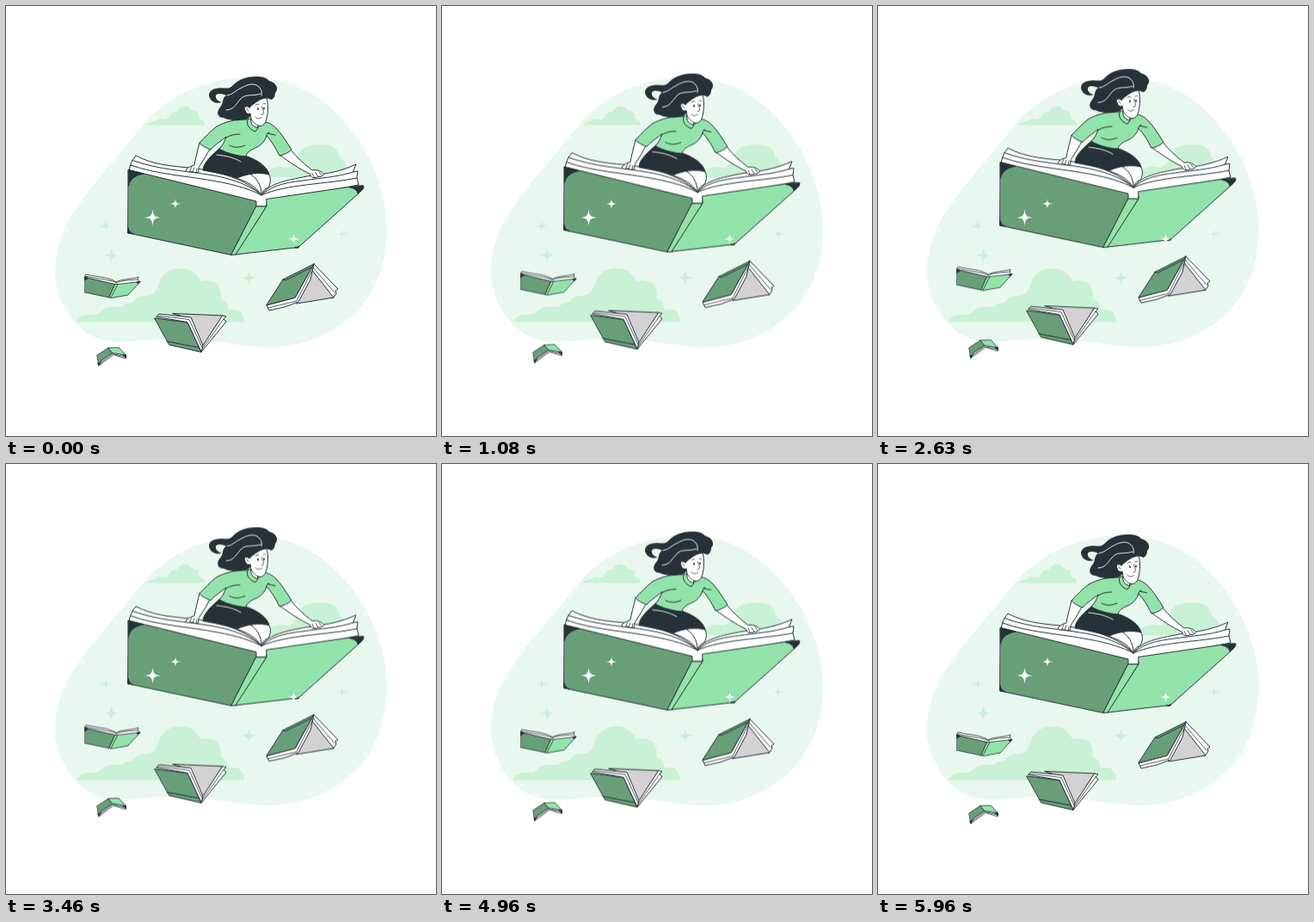
An HTML page without scripts that plays this animation: 500x500 px, repeating every 6 s.

```html
<!DOCTYPE html>
<html lang="en">
<head>
<meta charset="utf-8">
<title>Flying books</title>
<style>
  html, body { margin: 0; width: 100%; height: 100%; overflow: hidden; background: #fff; }
  svg { display: block; width: 100vw; height: 100vh; }
  .pale { fill: #e8f8ee; }
  .mist { fill: #c9f1d5; }
  .white { fill: #fff; }
  .ink { fill: #263238; }
  .dark { fill: #689f78; }
  .light { fill: #92e3a9; }
  .gray { fill: #d3d1d2; }
  .none { fill: none; }
  .thin { stroke-width: .8; }
  .shine { fill: none; stroke: #fff; stroke-width: .9; }
  .float {
    stroke: #263238; stroke-width: 1; stroke-linejoin: round; stroke-linecap: round;
    animation: float 6s infinite;
  }
  @keyframes float {
    0%, 100% { transform: translateY(0); animation-timing-function: steps(72); }
    50% { transform: translateY(-10px); animation-timing-function: steps(72); }
  }
</style>
</head>
<body>
<svg viewBox="0 0 500 500">
  <defs>
    <path id="star" d="M0-10C.6-2.200 2.200-.6 10 0C2.200.6.6 2.200 0 10C-.6 2.200-2.200.6-10 0C-2.200-.6-.6-2.200 0-10Z"/>
  </defs>

  <path class="pale" d="M283 83C235 83 185 105 157 141C130 176 95 212 75 246C60 272 54 300 58 322C63 350 82 378 108 387C130 394 160 388 185 387C230 384 260 396 305 397C345 398 392 378 418 343C440 312 445 275 442 243C437 190 405 135 360 105C335 89 310 83 283 83Z"/>

  <g class="mist">
    <path d="M163 138.500C167 134 171 135 175 133C178 130 183 133 187 131.500C190 129 190 125 194 123.500C197 123 198 124 200 121C202 116.500 211 115 214 119C216 123 221 121 223.500 125C225 128 223 130 226 132C230 133 231 136 231 138.500Z"/>
    <path d="M300 199C304 191 311 187 319 187C326 187 329 190 334 184C340 180 338 172 345 166C352 161 374 159 382 165C388 170 386 176 391 179C398 183 395 189 402 192L406 199Z"/>
    <path d="M82 367.500C86 360 93 358 102 359C110 359 111 351 121 350C130 349 133 352 139 347C144 344 146 347 150 342C154 336 161 338 168 336C176 333 175 327 178 322C182 310 191 305 204 305C214 305 222 311 226 320C234 318 243 319 247 326C251 332 249 337 250 341C257 343 258 348 259 353C264 354 269 351 273 356C276 360 277 364 276.500 367.500Z"/>
    <use href="#star" transform="translate(116 256) scale(.72)"/>
    <use href="#star" transform="translate(122.500 290)"/>
    <use href="#star" transform="translate(282.500 316)"/>
    <use href="#star" transform="translate(391 265) scale(.65)"/>
  </g>

  <g class="float">
    <!-- open book: pages -->
    <path class="white" d="M143 191L145 184L147 179.500L151 174C170 184 190 186 212 188C250 192 280 202 297 220C306 206 325 203 350 198C375 195 390 192 407 184L403.500 193L409 192L408 200L410 208L303 229V233H291Z"/>
    <path class="none" d="M147 179.500C180 191 205 191 235 196C262 200 285 209 297 220M145 185C175 196 215 198 245 204C268 208 286 214 297 220M403.500 193C385 199 365 200 345 203C320 206 308 210 297 220M408 200C375 207 325 207 297 220"/>

    <!-- rider: legs and skirt -->
    <path class="white" d="M268 197C282 193 297 192 306 196C308 200 308 206 305 211C300 213 298 216 297 220C291 210 281 204 264 199Z"/>
    <path class="none" d="M283 195C291 199 297 208 297 219"/>
    <path class="ink" d="M249 165C241 172 229 182 229 191C240 193 256 196 269 200C280 195 295 193 306 196C304 187 293 179 278 174Z"/>
    <path class="shine" d="M245 173C255 174 265 176 273 181"/>

    <!-- arms -->
    <path class="white" d="M225 159C223 168 220 178 219 185C215 186 211 188 209 191C210 194 213 193 215 192C218 194 221 194 224 193C223 189 225 186 227 183C231 177 234 172 237 166Z"/>
    <path class="none thin" d="M213.500 192.500L216 187M217 193.500L219 188M221 194L222 189"/>
    <path class="white" d="M318 173C330 182 342 190 353 195C355 198 355 200 358 199.500C361 200 362 199 363 198.500C366 199 367 198 367.500 197.500C370 197 370 195 367 193C364 191 360 190 356 191C347 184 338 176 331 167Z"/>
    <path class="none thin" d="M358 199L356 194.500M363 198.500L360 193.500M367.500 197.500L364 193"/>

    <!-- shirt -->
    <path class="light" d="M281 132C268 131 254 135 245 140C238 145 231 153 225 159C228 163 233 165 238 167C242 162 250 157 256 152C254 158 252 162 248 166C256 171 268 174 279 175C280 170 285 167 290 165C297 162 301 157 303 151C309 157 314 166 318 174C323 173 328 171 332 167C326 158 321 149 314 142C309 137 304 135 301 135L291 143Z"/>
    <path class="none" d="M272 149C266 149 261 150 256 153M303 151C303 149 304 148 306 147M260 162C265 165 271 165 278 162M304 148L313 150"/>

    <!-- hair behind the face -->
    <path class="ink" stroke="none" d="M292 82C280 81.500 269 86 263 93C258 98 254 94 247 95.500C238 96 234 102 237 107C239 112 246 114 251 112C247 111 243 108 244 104C246 101 252 102 256 104C250 108 254 113 248 119C244 125 247 130 253 130C261 134 274 134 281 131C287 127 288 121 286 115L303 107L309 109C312 107 313 104 313 101C318 96 314 89 306 87C303 83 297 82 292 82Z"/>

    <!-- face and neck -->
    <path class="white" d="M283 118C279 115 276 118 278 121C279 125 281 126 284 125C285 128 285 131 284 135C284 140 289 143 292 142L293 139C299 141 302 136 303 131C305 123 305 113 303 107C296 107 290 112 283 118Z"/>
    <path class="light" d="M281 132C279 137 282 143 290 146L293 142C287 140 284 137 285 131Z"/>
    <path class="none thin" d="M285 131C287 135 290 138 293 139M297.500 117C298 121 301 123 299 125.500L297 126M290 129C292 131.500 295 131.500 297.500 129.500M290 115.500C291 114 293 113.500 294 114.500M299 114C300 113 301 113 302 114M279.500 119L282 122"/>
    <ellipse class="ink" cx="293" cy="119.500" rx=".9" ry="1.500" stroke="none"/>
    <ellipse class="ink" cx="300" cy="119" rx=".9" ry="1.500" stroke="none"/>
    <path class="shine" d="M257 104C264 103 267 98 274 95C281 91 289 89 294 94C297 97 298 101 297 104M256 121C266 121 268 112 274 107C279 102 289 105 296 102"/>

    <!-- open book: covers -->
    <path class="dark" d="M142.500 190.500L291 227V233L262 289.500L142 264Z"/>
    <path class="ink" d="M142.500 190.500L160 195C149 197 144 202 142.500 209ZM142 258C143 262 145 264 148 265L142 264Z"/>
    <path class="light" d="M291 233H303L268 289L262 289.500Z"/>
    <path class="light" d="M303 224.500L408 209L416 209C416 213 414 214 411 217L340 280.500L267 289L303 233Z"/>
    <path class="ink" d="M400 211L415 209C417 212 413 215 409 218C408 214 405 212 400 211ZM336 281L341 279.500L340 281Z"/>

    <!-- small open book -->
    <g class="thin">
      <path class="white" d="M91.500 315L93 312C105 315 120 315 128 321C135 317 146 318 154 315L153 318L156 321L129 325L127 324Z"/>
      <path class="none" d="M92 314C105 317 120 318 128 321.500M153 318C143 319 134 319 128 322"/>
      <path class="dark" d="M91.500 315.500L127 323.500L120 339L91.500 333Z"/>
      <path class="light" d="M127 323.500H130L156 320.500L142 336L123 339.500L120 339Z"/>
      <path class="none" d="M130 323.500L122 339"/>
      <path class="ink" d="M91.500 315L96 316.500L91.500 319ZM152 321L156 320.500L154 323Z"/>
    </g>

    <!-- tiny tented book -->
    <g class="thin">
      <path class="white" d="M108 418L111 412L124 403L139.500 406L139 410L125 405.500L111 416Z"/>
      <path class="none" d="M110 415L124 404.500L139 408"/>
      <path class="dark" d="M106 406L119 397.500L124 403L110 413L108 417.500Z"/>
      <path class="light" d="M119 397.500L131 397L139.500 406L124 403.500Z"/>
      <path class="ink" d="M107 415L110 415L108 418ZM136 406L139.500 406L139.500 409Z"/>
    </g>

    <!-- lower book -->
    <g>
      <path class="gray" d="M194 357.500L252 360L229 397L214 364Z"/>
      <path class="white" d="M175 361L178 358L215 362L230 397L227 402L211 368Z"/>
      <path class="none thin" d="M177 360L213 364.500L229 399"/>
      <path class="white" d="M252 360L256 361L253 364L256 367L227 402.500L229 395Z"/>
      <path class="none thin" d="M253 364L228 399"/>
      <path class="dark" d="M173 363L211 368L227 402.500L190 394Z"/>
      <path class="none" d="M187 390L224 397"/>
    </g>

    <!-- right tented book -->
    <g>
      <path class="white" d="M358 300L386 329L383 331L384 334L380 340L352 308Z"/>
      <path class="none thin" d="M357 304L382 333"/>
      <path class="gray" d="M355 306L381 339L338 346Z"/>
      <path class="white" d="M358 300L354 318L340 344L324 350L306 354L303 348L336 339Z"/>
      <path class="none thin" d="M357 305L338 343L305 351"/>
      <path class="dark" d="M303 347.500L322 318L358 300L336 339Z"/>
      <path class="none" d="M322 318L325 319L355 304"/>
    </g>
  </g>

  <g class="white">
    <use href="#star" transform="translate(170.500 246)"/>
    <use href="#star" transform="translate(197 230) scale(.62)"/>
    <use href="#star" transform="translate(334.500 271) scale(.65)"/>
  </g>
</svg>
</body>
</html>
```
